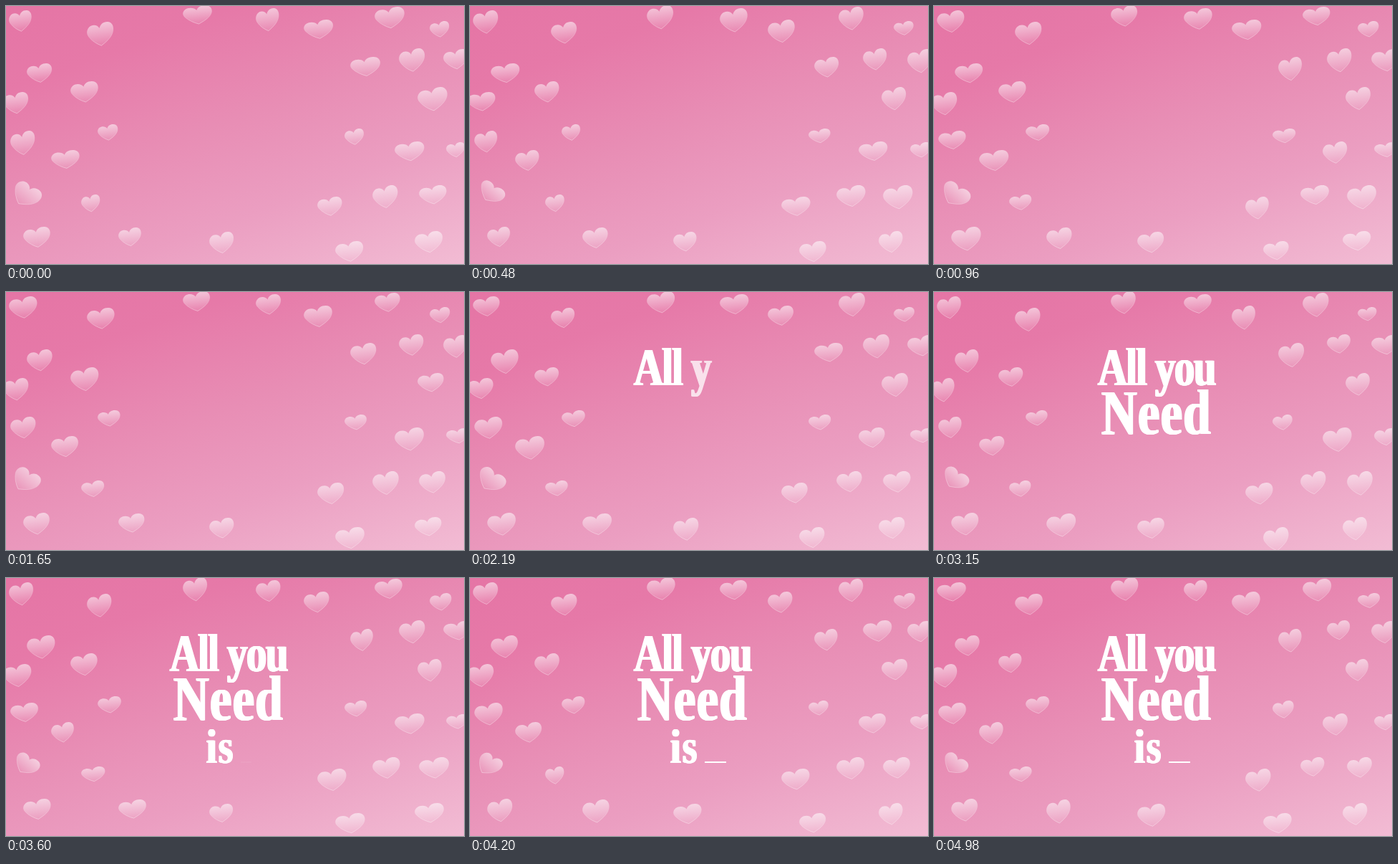
These frames come from a looping animation (640 px wide and 360 px high, 5010 ms). An HTML page:

```html
<!DOCTYPE html>
<html lang="en">
<head>
<meta charset="utf-8">
<title>Hearts</title>
<style>
  html, body { margin: 0; width: 100%; height: 100%; overflow: hidden; }
  body {
    position: relative;
    background: linear-gradient(160deg, #e575a5 0%, #e679a8 20%, #e88eb5 47%, #eb9ec1 70%, #f2bcd4 100%);
  }
  svg { position: absolute; left: 0; top: 0; width: 640px; height: 360px; }
  path {
    fill: url(#shine);
    stroke: url(#rim);
    stroke-width: .9;
    vector-effect: non-scaling-stroke;
  }
  /* Zero line height puts the baseline .3375em below the top. */
  .word {
    position: absolute;
    margin-top: -.3375em;
    font: 700 72px/0 "Liberation Serif", "Times New Roman", serif;
    white-space: nowrap;
    color: #fff;
    text-shadow: 1.5px 0 #fff, -1.5px 0 #fff, .8px 0 #fff, -.8px 0 #fff;
    transform: scaleX(.78);
    transform-origin: 0 0;
  }
  .dash { position: absolute; top: 256px; width: 15px; height: 2px; background: #fff; }
</style>
</head>
<body>
<svg viewBox="0 0 640 360">
  <defs>
    <linearGradient id="shine" x1=".4" y1="0" x2=".55" y2="1">
      <stop offset="0" stop-color="#fff" stop-opacity=".6"/>
      <stop offset="1" stop-color="#fff" stop-opacity=".07"/>
    </linearGradient>
    <linearGradient id="rim" x1=".4" y1="0" x2=".55" y2="1">
      <stop offset=".3" stop-color="#fff" stop-opacity="0"/>
      <stop offset="1" stop-color="#fff" stop-opacity=".45"/>
    </linearGradient>
  </defs>
  <g id="hearts"></g>
</svg>
<script>
const LOOP = 5010, STEP = 30, BEAT = 450, SWAY = 0.14, PACE = 100;
const HEART = 'M.47 .27C.4 .12 .2 .1 .09 .22C-.02 .35 -.02 .52 .08 .65C.2 .82 .4 .95 .55 1' +
  'C.68 .88 .9 .7 .97 .45C1.04 .22 .95 0 .77 0C.6 0 .5 .12 .47 .27Z';

// Top left corner of each heart, the point it stretches from.
const LARGE = [
  [4, 6], [113, 22], [247, -1], [349, 3], [416, 19], [515, 1], [481, 71], [549, 59],
  [611, 60], [575, 113], [29, 80], [90, 105], [-4, 120], [6, 174], [63, 201], [24, 308],
  [157, 309], [284, 315], [435, 266], [460, 328], [512, 250], [577, 250], [571, 314], [543, 189]
];
const SMALL = [[592, 21], [128, 165], [105, 263], [473, 171], [615, 190]];
const TILTED = [[10, 245]];

let seed = 71;
const random = () => (seed = seed * 16807 % 2147483647) / 2147483647;

// Smooth random drift around a mean.
function wiggle(mean) {
  const keys = Array.from({ length: LOOP / BEAT + 2 }, () => mean * (1 + SWAY * (2 * random() - 1)));
  return t => {
    const i = Math.floor(t / BEAT), f = t / BEAT - i;
    return keys[i] + (keys[i + 1] - keys[i]) * f * f * (3 - 2 * f);
  };
}

const hearts = [];
function addHearts(corners, w, h, turn = 0) {
  for (const [x, y] of corners) {
    const node = document.createElementNS('http://www.w3.org/2000/svg', 'path');
    node.setAttribute('d', HEART);
    document.getElementById('hearts').append(node);
    const place = `rotate(${turn} ${x + w / 2} ${y + h / 2}) translate(${x} ${y})`;
    hearts.push({ node, place, width: wiggle(w), height: wiggle(h) });
  }
}
addHearts(LARGE, 37, 29.5);
addHearts(SMALL, 30, 21.5);
addHearts(TILTED, 36, 31, 45);

const parts = [];
function add(tag, parent, style, className = '') {
  const node = document.createElement(tag);
  node.className = className;
  Object.assign(node.style, style);
  parent.append(node);
  return node;
}
function addWord(word, x, baseline, size, gap, start) {
  const box = add('div', document.body, {
    left: x + 'px', top: baseline + 'px', fontSize: size + 'px', letterSpacing: gap + 'px'
  }, 'word');
  [...word].forEach((char, i) => {
    const node = add('span', box, {});
    node.textContent = char;
    parts.push({ node, start: start + i * PACE });
  });
}
addWord('All', 229, 131, 73, -2.5, 1715);
addWord('you', 309, 131, 73, -2, 2115);
addWord('Need', 234, 199, 88, 1.6, 2345);
addWord('is', 280, 258, 67, 3, 3300);
for (const i of [0, 1]) {
  const node = add('div', document.body, { left: 328 + 15 * i + 'px' }, 'dash');
  parts.push({ node, start: 3595 + i * PACE });
}

function draw(t) {
  for (const { node, place, width, height } of hearts) {
    node.setAttribute('transform', `${place} scale(${width(t)} ${height(t)})`);
  }
  for (const { node, start } of parts) {
    node.style.opacity = Math.max(0, Math.min(1, (t - start) / PACE));
  }
}

const begin = performance.now();
function tick() {
  const elapsed = Math.max(0, performance.now() - begin) % LOOP;
  draw(Math.floor(elapsed / STEP) * STEP);
  requestAnimationFrame(tick);
}
tick();
</script>
</body>
</html>
```
